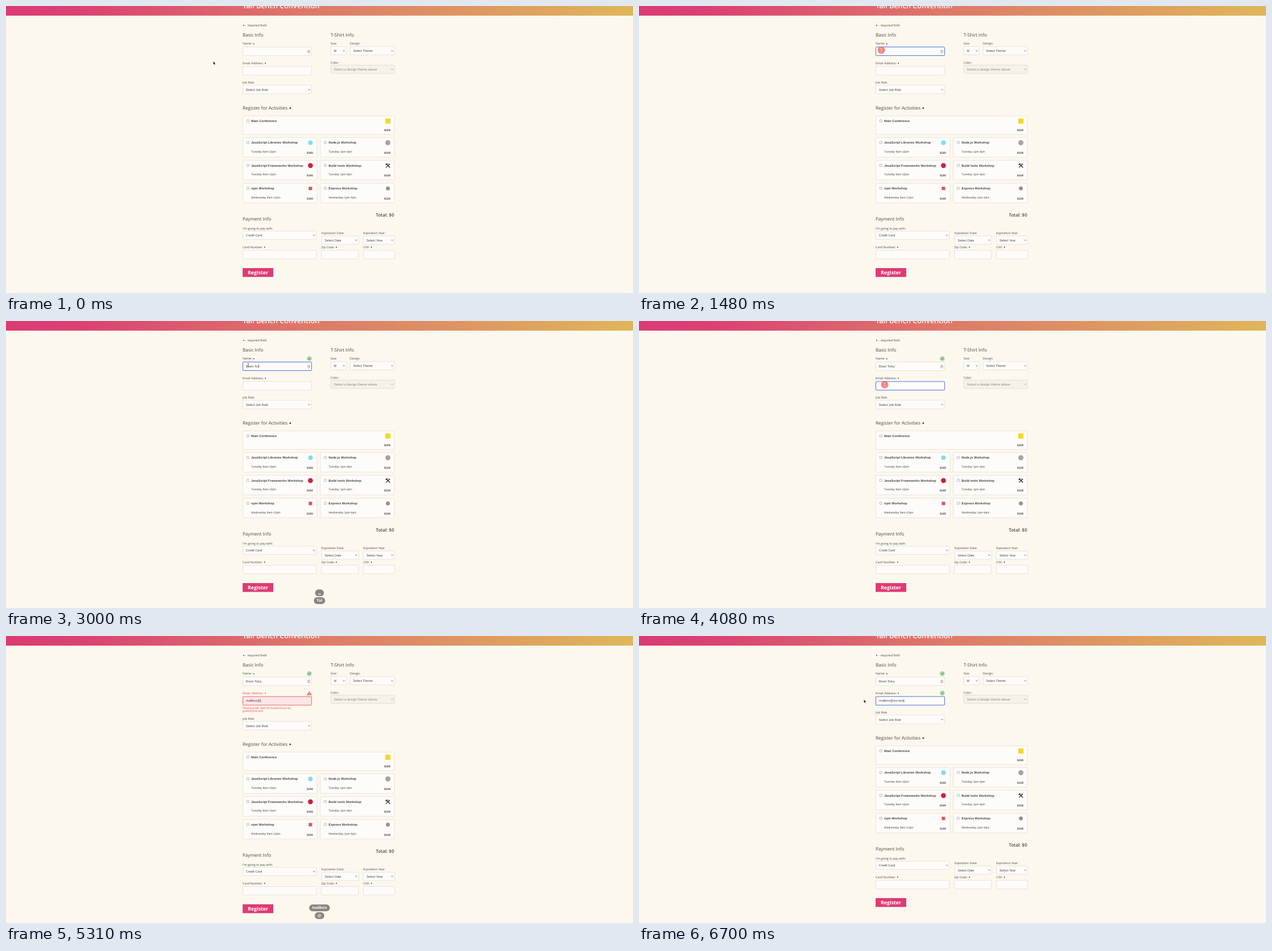
An HTML page with a canvas that plays this animation: 1105 px wide and 507 px high, repeating every 6.73 s.

```html
<!DOCTYPE html>
<html lang="en">
<head>
<meta charset="utf-8">
<title>Registration form</title>
<style>
html, body { margin: 0; width: 100%; height: 100%; overflow: hidden; background: #fcf8ee; }
canvas { display: block; width: 1105px; height: 507px; }
</style>
</head>
<body>
<canvas id="stage"></canvas>
<script>
const W = 1105, H = 507, LOOP = 6730;
const canvas = document.getElementById('stage');
const ratio = window.devicePixelRatio || 1;
canvas.width = W * ratio;
canvas.height = H * ratio;
const ctx = canvas.getContext('2d');
ctx.scale(ratio, ratio);
ctx.textRendering = 'geometricPrecision';

const HUMAN = '"Open Sans", sans-serif';
const PLAIN = '"Liberation Sans", Arial, sans-serif';
const INK = '#474543', RED = '#e0474b', BLUE = '#4673d6', PINK = '#df3a74';
const PAPER = '#fefbfa', EDGE = '#e3ddd5';
const SHIFT = 11;

// Typing schedule
const NAME = 'Bram Tolvy', MAIL = 'mailbox@our.test';
const nameKeys = [1960, 2110, 2250, 2390, 2540, 2640, 2760, 2900, 3015, 3030];
const mailKeys = Array.from(MAIL, (_, i) => 4700 + i * 83);
const NAME_FOCUS = 1300, MAIL_FOCUS = 4000;
const NAME_OK = nameKeys[5], MAIL_OK = mailKeys[15];
const ALERT_DELAY = 190, PILL_LIFE = 470;

const pills = [
  { text: NAME.slice(0, 4), keys: nameKeys.slice(0, 4) },
  { text: '\u2423', keys: nameKeys.slice(4, 5) },
  { text: NAME.slice(5), keys: nameKeys.slice(5) },
  { text: MAIL.slice(0, 7), keys: mailKeys.slice(0, 7) },
  { text: '@', keys: mailKeys.slice(7, 8) },
  { text: MAIL.slice(8), keys: mailKeys.slice(8) }
];

// Pointer stops: time, x, y
const route = [
  [0, 365.5, 98], [60, 365.5, 98], [690, 428, 82], [1000, 427, 78],
  [3540, 427, 78], [3960, 433, 112.5], [6280, 433, 112.5], [6580, 392, 113.5], [6690, 396.5, 112.5]
];

const pressed = (keys, t) => keys.filter(k => k <= t).length;
const ease = p => p * p * (3 - 2 * p);

function text(str, x, y, size, opt = {}) {
  const { font = HUMAN, weight = 400, color = INK, align = 'left' } = opt;
  ctx.font = `${weight} ${size}px ${font}`;
  ctx.textAlign = align;
  ctx.fillStyle = color;
  ctx.fillText(str, x, y);
  return ctx.measureText(str).width;
}

function dot(x, y, r, color) {
  ctx.fillStyle = color;
  ctx.beginPath();
  ctx.arc(x, y, r, 0, Math.PI * 2);
  ctx.fill();
}

function line(points, color, width) {
  ctx.strokeStyle = color;
  ctx.lineWidth = width;
  ctx.beginPath();
  points.forEach(([x, y], i) => i ? ctx.lineTo(x, y) : ctx.moveTo(x, y));
  ctx.stroke();
}

function box(x, y, w, h, fill = PAPER, edge = EDGE, width = 0.8) {
  ctx.beginPath();
  ctx.roundRect(x + 0.4, y + 0.4, w - 0.8, h - 0.8, 1);
  ctx.fillStyle = fill;
  ctx.fill();
  ctx.strokeStyle = edge;
  ctx.lineWidth = width;
  ctx.stroke();
}

function label(str, x, y, required = false, color = INK, size = 5.4, weight = 400) {
  const w = text(str, x, y, size, { color, weight });
  if (required) dot(x + w + size * 0.6, y - size * 0.3, size * 0.18, color);
}

const heading = (str, x, y, required) => label(str, x, y, required, INK, 8.1);

function select(str, x, y, w, h = 15.5, off = false) {
  box(x, y, w, h, off ? '#f6f1e9' : PAPER, off ? '#dfd8cc' : EDGE);
  const color = off ? '#8f8b86' : INK;
  text(str, x + 5.8, y + h / 2 + 2, off ? 5.95 : 5.6, { font: PLAIN, color });
  const cx = x + w - 4.7, cy = y + h / 2;
  line([[cx - 1.7, cy - 0.8], [cx, cy + 0.9], [cx + 1.7, cy - 0.8]], color, 0.8);
}

function card(x, y, w, h, title, time, price, icon) {
  box(x, y, w, h, PAPER, '#e6dfd3');
  ctx.strokeStyle = '#8b8885';
  ctx.lineWidth = 0.6;
  ctx.beginPath();
  ctx.roundRect(x + 7.2, y + 7.2, 4, 4, 0.8);
  ctx.stroke();
  text(title, x + 15, y + 11.4, 5.6, { font: PLAIN, weight: 700 });
  if (time) text(time, x + 15, y + 27, 5, { font: PLAIN });
  text(price, x + w - 7.5, y + h - 6.5, 5, { font: PLAIN, weight: 700, align: 'right' });
  icon(x + w - 12, y + 9.5);
}

const disc = (r, color) => (x, y) => dot(x, y, r, color);
const square = (s, color) => (x, y) => {
  ctx.fillStyle = color;
  ctx.fillRect(x - s / 2, y - s / 2, s, s);
};

function tools(x, y) {
  line([[x - 2, y - 2.4], [x + 3.6, y + 3.6]], '#292727', 1.4);
  line([[x - 3.5, y + 3.6], [x + 2.5, y - 2.2]], '#292727', 1.3);
  line([[x - 4, y - 1.2], [x - 1, y - 3.6]], '#292727', 1.7);
  line([[x + 1.6, y - 3.6], [x + 2.2, y - 1.7], [x + 4, y - 1.5]], '#292727', 1.1);
}

function tick(x, y) {
  dot(x, y, 4.2, '#a5d2a8');
  line([[x - 2, y], [x - 0.5, y + 1.6], [x + 2.3, y - 1.6]], '#559663', 1);
}

function warning(x, y) {
  ctx.beginPath();
  ctx.moveTo(x, y - 4);
  ctx.lineTo(x + 4.5, y + 3.7);
  ctx.lineTo(x - 4.5, y + 3.7);
  ctx.closePath();
  ctx.fillStyle = '#ec7470';
  ctx.fill();
  line([[x, y - 1.8], [x, y + 1.2]], '#fff0ee', 0.9);
  dot(x, y + 2.5, 0.5, '#fff0ee');
}

// Labelled input with its validation state; y is the top of the box
function field(t, f) {
  const { y, keys, focus, blur, ok } = f;
  const n = pressed(keys, t);
  const wrong = n > 0 && t < ok;
  const alert = wrong && t > keys[0] + ALERT_DELAY;
  const focused = t >= focus && t < blur;
  label(f.label, 417, y - 3.6, true, alert ? RED : INK);
  const edge = alert ? '#e56a6f' : focused ? BLUE : EDGE;
  box(417, y, 122, 16, alert ? '#fde4e5' : PAPER, edge, focused ? 1 : 0.8);
  const w = text(f.value.slice(0, n), 423, y + 9.8, 5.6, { font: PLAIN });
  if (focused && n) line([[423.7 + w, y + 5], [423.7 + w, y + 11]], INK, 0.6);
  if (wrong) {
    warning(534.5, y - 5.6);
    f.message.forEach((m, i) => text(m, 417, y + 22.1 + i * 5.6, 5.1, { color: RED }));
  } else if (n) {
    tick(534.5, y - 5.6);
  }
  return wrong;
}

function header() {
  const g = ctx.createLinearGradient(0, 0, W, 0);
  g.addColorStop(0, '#da3b74');
  g.addColorStop(0.12, '#da4273');
  g.addColorStop(0.5, '#dd7b69');
  g.addColorStop(1, '#dfb65a');
  ctx.fillStyle = g;
  ctx.fillRect(0, 0, W, 17);
  text('Tall Bench Convention', 417, 4, 12.7, { weight: 600, color: '#fff6ef' });
}

function shirt() {
  heading('T-Shirt Info', 572, 53.7);
  label('Size:', 572, 68.4);
  select('M', 572, 71.3, 28);
  label('Design:', 606, 68.4);
  select('Select Theme', 606, 71.3, 79.3);
  label('Color:', 572, 101.6);
  select('Select a design theme above', 572, 104, 113.3, 15.5, true);
}

function lowerForm() {
  label('Job Role', 417, 137);
  select('Select Job Role', 417, 139.5, 122, 16);
  heading('Register for Activities', 417, 183, true);

  card(417, 193.7, 268, 33.5, 'Main Conference', '', '$200', square(9, '#f3d91f'));
  const morning = 'Tuesday 9am-12pm', noon = 'Tuesday 1pm-4pm';
  const rows = [
    [232, ['JavaScript Libraries Workshop', morning, disc(4, '#7edcf2')],
          ['Node.js Workshop', noon, disc(4.5, '#a6a3a0')]],
    [272.3, ['JavaScript Frameworks Workshop', morning, disc(4.4, '#cf1f38')],
            ['Build tools Workshop', noon, tools]],
    [312.8, ['npm Workshop', 'Wednesday 9am-12pm', square(6, '#dc5553')],
            ['Express Workshop', 'Wednesday 1pm-4pm', disc(3.5, '#96938f')]]
  ];
  for (const [y, ...pair] of rows) {
    pair.forEach(([title, time, icon], i) =>
      card(417 + i * 136.5, y, 131.5, 35.3, title, time, '$100', icon));
  }

  text('Total: $0', 684, 372.3, 8, { weight: 600, align: 'right' });
  heading('Payment Info', 417, 379);
  label("I'm going to pay with:", 417, 394.8);
  select('Credit Card', 417, 397.3, 130.5);
  label('Expiration Date:', 556, 403.3);
  select('Select Date', 556, 405.8, 66);
  label('Expiration Year:', 629.5, 403.3);
  select('Select Year', 629.5, 405.8, 55.8);
  const inputs = [['Card Number:', 417, 130.5], ['Zip Code:', 555.5, 66], ['CVV:', 629.5, 55.8]];
  for (const [name, x, w] of inputs) {
    label(name, x, 427.7, true);
    box(x, 431, w, 16);
  }

  ctx.fillStyle = PINK;
  ctx.fillRect(417, 463, 54, 15.6);
  text('Register', 444, 473.8, 8.8, { weight: 700, color: '#fff', align: 'center' });
}

function keyPills(t) {
  const live = pills.filter(p => t >= p.keys[0] && t < p.keys[pressed(p.keys, t) - 1] + PILL_LIFE);
  live.reverse().forEach((p, i) => {
    const str = p.text.slice(0, pressed(p.keys, t));
    ctx.font = `700 7px ${PLAIN}`;
    const w = Math.max(15.5, ctx.measureText(str).width + 10);
    const y = 494 - i * 13.8;
    ctx.fillStyle = '#888580';
    ctx.beginPath();
    ctx.roundRect(552.5 - w / 2, y - 6, w, 12, 6);
    ctx.fill();
    text(str, 552.5, y + 2.2, 7, { font: PLAIN, weight: 700, color: '#fff', align: 'center' });
  });
}

function pointerAt(t) {
  const i = route.findIndex(stop => stop[0] > t);
  if (i < 0) return route[route.length - 1].slice(1);
  const [t0, x0, y0] = route[i - 1], [t1, x1, y1] = route[i];
  const p = ease((t - t0) / (t1 - t0));
  return [x0 + (x1 - x0) * p, y0 + (y1 - y0) * p];
}

function pointer(t) {
  if (t > 4980 && t < 6280) return;
  const [x, y] = pointerAt(t);
  const click = [NAME_FOCUS, MAIL_FOCUS].some((c, i) => t >= c && t < c + (i ? 220 : 300));
  if (click) dot(x, y, 6.5, 'rgba(237, 92, 90, 0.75)');
  if (x > 417) {
    const c = click ? '#fbe3df' : '#555250';
    line([[x, y - 3], [x, y + 3]], c, 0.8);
    line([[x - 1.4, y - 3.2], [x + 1.4, y - 3.2]], c, 0.7);
    line([[x - 1.4, y + 3.2], [x + 1.4, y + 3.2]], c, 0.7);
    return;
  }
  ctx.beginPath();
  [[0, 0], [0, 5], [1.1, 4], [2, 6], [2.9, 5.6], [2, 3.7], [3.5, 3.6]]
    .forEach(([dx, dy]) => ctx.lineTo(x + dx, y + dy));
  ctx.closePath();
  ctx.fillStyle = '#191818';
  ctx.fill();
}

function draw(t) {
  ctx.fillStyle = '#fcf8ee';
  ctx.fillRect(0, 0, W, H);
  header();
  dot(419, 34.3, 1, INK);
  text('- required field', 422.3, 35.7, 5.4);
  heading('Basic Info', 417, 53.7);
  shirt();

  let push = 0;
  if (field(t, {
    label: 'Name:', y: 72, value: NAME, keys: nameKeys,
    focus: NAME_FOCUS, blur: MAIL_FOCUS, ok: NAME_OK,
    message: ['Please enter First Name and Last Name (last', 'name hyphen accepted).']
  })) push += SHIFT;
  box(531.3, 77.8, 4.6, 5.4, '#f1eeeb', '#9a9692', 0.7);
  dot(533.6, 80, 0.8, '#8d8985');

  ctx.save();
  ctx.translate(0, push);
  if (field(t, {
    label: 'Email Address:', y: 106.5, value: MAIL, keys: mailKeys,
    focus: MAIL_FOCUS, blur: Infinity, ok: MAIL_OK,
    message: ['Please enter well formated Email ex:', 'guest@site.test']
  })) ctx.translate(0, SHIFT);
  lowerForm();
  ctx.restore();

  keyPills(t);
  pointer(t);
}

const start = performance.now();
function tickFrame() {
  draw((performance.now() - start) % LOOP);
  requestAnimationFrame(tickFrame);
}
tickFrame();
</script>
</body>
</html>
```
